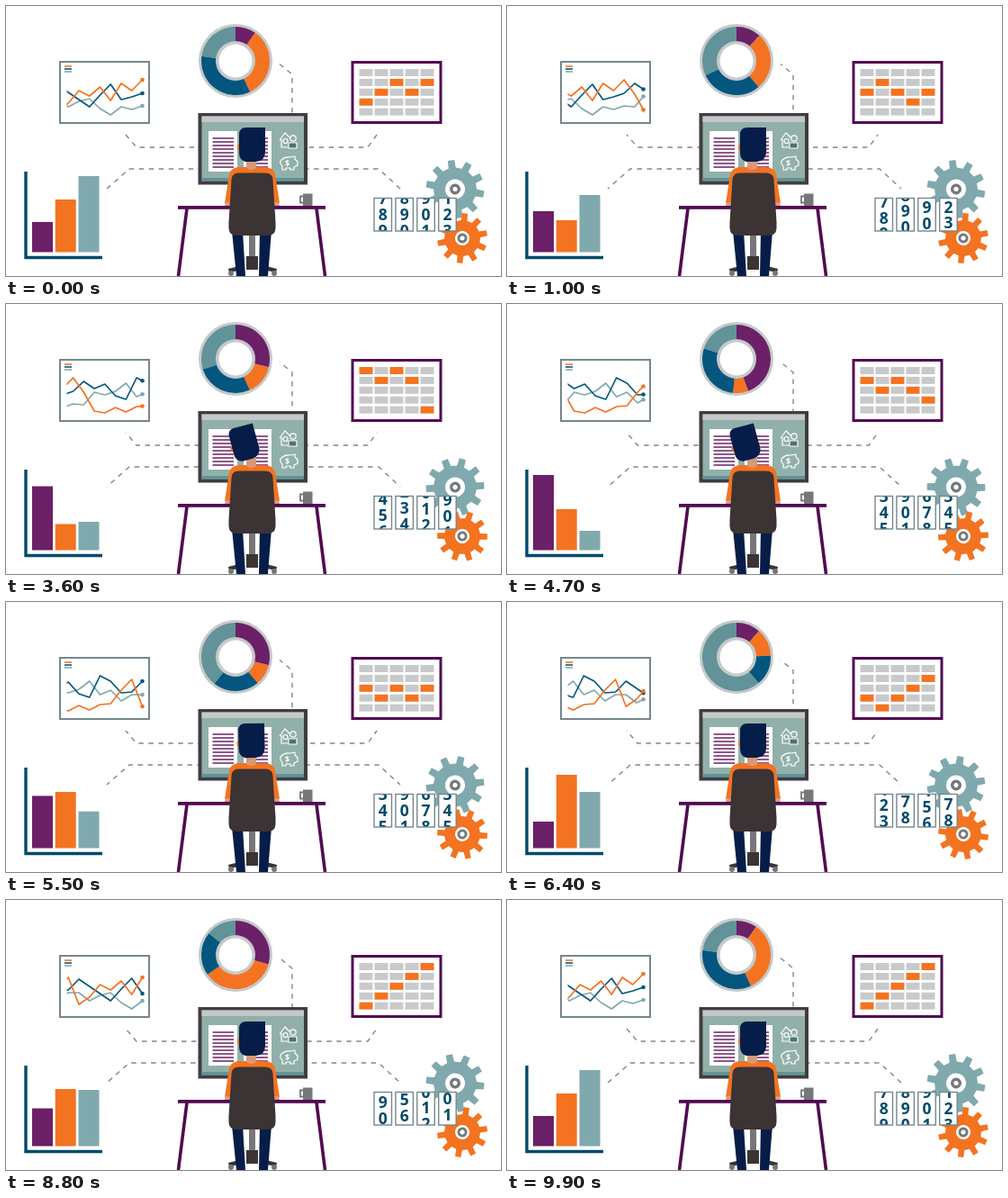
Recreate the animation shown at these times as an HTML page. Size 550 px wide and 300 px high, loop 10 s.

```html
<!DOCTYPE html>
<html lang="en">
<head>
<meta charset="utf-8">
<title>Office dashboard</title>
<style>
html, body { margin: 0; width: 100%; height: 100%; overflow: hidden; background: #fff; }
svg { display: block; width: 550px; height: 300px; }
.purple { fill: #6b2068; }
.orange { fill: #f37321; }
.navy { fill: #04567f; }
.teal { fill: #80a9ae; }
#links path { fill: none; stroke: #85878a; stroke-width: 1.4; stroke-dasharray: 5.5 5.5; }
#lines path { fill: none; stroke-width: 1.7; stroke-linejoin: round; }
#icons { fill: none; stroke: #fff; stroke-width: 1.2; stroke-linejoin: round; }
#reels text { font: bold 17.5px "Open Sans", "Noto Sans", sans-serif; fill: #004a6b; text-anchor: middle; }
</style>
</head>
<body>
<svg viewBox="0 0 550 300">
  <defs>
    <clipPath id="plot"><rect x="67.5" y="64" width="85" height="64"/></clipPath>
    <clipPath id="window"><rect x="405" y="214" width="100" height="35.5"/></clipPath>
  </defs>

  <g id="links">
    <path d="M133 143L145 157H214"/>
    <path d="M112 203L137 181H214"/>
    <path d="M412 143L402 157H335"/>
    <path d="M438 203L414 181H335"/>
    <path d="M304 64.500L318 76V120"/>
  </g>

  <!-- line chart -->
  <rect x="60" y="62" width="99" height="68" fill="#fff" stroke="#75878e" stroke-width="2"/>
  <path d="M65 67H73" stroke="#f37321" stroke-width="1.6"/>
  <path d="M65 70H73" stroke="#04567f" stroke-width="1.6"/>
  <path d="M65 73H73" stroke="#80a9ae" stroke-width="1.6"/>
  <g id="lines"></g>

  <!-- bar chart -->
  <g id="bars"></g>
  <path d="M22 184V279.500H107" fill="none" stroke="#004a6b" stroke-width="3.400"/>

  <!-- donut -->
  <circle cx="255" cy="61" r="41" fill="#c7c9cb"/>
  <g id="donut"></g>
  <circle cx="255" cy="61" r="22" fill="#c7c9cb"/>
  <circle cx="255" cy="61" r="18.500" fill="#fff"/>

  <!-- calendar -->
  <rect x="385" y="62.500" width="98" height="67" fill="#fff" stroke="#520a52" stroke-width="3"/>
  <g id="cells"></g>

  <!-- gears and counter -->
  <g id="gears"></g>
  <g id="reels"></g>

  <!-- monitor -->
  <rect x="213.500" y="119" width="121.500" height="79.500" fill="#403c40"/>
  <rect x="217.500" y="122.500" width="113.500" height="72" fill="#92b0aa"/>
  <rect x="217.500" y="122.500" width="113.500" height="6.500" fill="#c4c8c8"/>
  <rect x="217.500" y="191" width="113.500" height="3.500" fill="#619398"/>
  <path d="M225 139H257V184H225ZM264 139H295V184H264Z" fill="#fff"/>
  <g id="print" stroke="#6b2068" stroke-width="1.600"></g>
  <g id="icons">
    <path d="M304 149L310 141L316 147M306 148V157H313"/>
    <circle cx="310.500" cy="150" r="2.500"/>
    <circle cx="319" cy="147" r="3.200"/>
    <rect x="314" y="152" width="9" height="6" fill="#4f6f78"/>
    <path d="M306 171Q310 167 316 168L321 167V170L324 173V177L320 179V182H316V180H311V182H307V178Q303 174 306 171Z"/>
  </g>
  <text x="312.500" y="177.500" font-family="Open Sans, sans-serif" font-size="9" font-weight="700" fill="#fff" text-anchor="middle">$</text>

  <!-- desk -->
  <path d="M201 225L191.500 300M345 225L354.500 300" stroke="#520a52" stroke-width="3.600"/>
  <rect x="191" y="222" width="164" height="3.800" fill="#520a52"/>
  <path d="M330 208.500H340.500V222H330Z" fill="#77777b"/>
  <path d="M330 211.500H327V218.500H330" fill="none" stroke="#77777b" stroke-width="1.800"/>

  <!-- worker and chair -->
  <path d="M247 292L263 288V293L248 296ZM301 292L285 288V293L300 296Z" fill="#3b3334"/>
  <circle cx="250" cy="297" r="3" fill="#77777b"/>
  <circle cx="298" cy="297" r="3" fill="#77777b"/>
  <path d="M251 250H263L266 300H256ZM282 250H295L291 300H281Z" fill="#061d49"/>
  <path d="M243 219L248 187Q250 179 260 179H287Q297 179 299 187L304 219H297V224H250V219Z" class="orange"/>
  <path d="M244 218H249V222H243ZM298 218H303L304 222H298Z" fill="#d79a78"/>
  <path d="M267 168H278V180Q272.500 184 267 180Z" fill="#d79a78"/>
  <g id="head">
    <ellipse cx="259" cy="157" rx="2" ry="3.500" class="orange"/>
    <ellipse cx="286" cy="161" rx="2.600" ry="4.500" fill="#d79a78"/>
    <path d="M259 143Q259 135 267 135H288V162Q288 172 278 173H266Q259 171 259 163Z" fill="#061d49"/>
  </g>
  <path d="M270 252H277V292H270Z" fill="#77777b"/>
  <path d="M267 278H280V293H267Z" fill="#3b3334"/>
  <path d="M250.500 193Q251 185.500 259 185.500H288Q296 185.500 296.500 193L299.500 240V247Q299 255 291 255H256Q248 255 247.500 247V240Z" fill="#3b3334"/>
</svg>

<script>
const LOOP = 10000, LAST = 9900, STEP = 100;
const $ = id => document.getElementById(id);

function add(parent, tag, attrs, text) {
  const el = document.createElementNS("http://www.w3.org/2000/svg", tag);
  for (const k in attrs) el.setAttribute(k, attrs[k]);
  if (text !== undefined) el.textContent = text;
  parent.append(el);
  return el;
}

const clamp = (v, a, b) => Math.min(b, Math.max(a, v));
const mod = (v, n) => (v % n + n) % n;
const smooth = (t, a, b) => {
  const u = clamp((t - a) / (b - a), 0, 1);
  return u * u * (3 - 2 * u);
};

// Linear interpolation through shared key times
const TIMES = [0, 1000, 2500, 4700, 6400, 7700, 9900];
function tween(keys, t) {
  let i = 0;
  while (i < TIMES.length - 2 && t >= TIMES[i + 1]) i++;
  const u = (t - TIMES[i]) / (TIMES[i + 1] - TIMES[i]);
  return keys[i] + (keys[i + 1] - keys[i]) * u;
}

// Scrolling line chart: repeating points pass under a fixed end dot
const POINTS = 18, SPACING = 11.75, END_X = 151.5;
const series = [
  ["#80a9ae", [112,106,103,114,121,112,115,111,112,98,101,97,88,103,98,110,103,103]],
  ["#04567f", [96,104,112,99,87,104,101,97,86,94,89,102,106,82,88,101,100,88]],
  ["#f37321", [108,94,100,90,105,86,94,82,98,119,121,115,120,114,113,98,86,116]]
].map(([color, ys]) => ({
  ys,
  path: add($("lines"), "path", { stroke: color, "clip-path": "url(#plot)" }),
  dot: add($("lines"), "circle", { cx: END_X, r: 2.3, fill: color })
}));

function drawLines(p) {
  const scroll = p * POINTS, first = Math.floor(scroll), f = scroll - first;
  for (const { ys, path, dot } of series) {
    const at = k => ys[mod(k + 7, POINTS)];
    const pts = [];
    for (let k = first - 8; k <= first + 1; k++)
      pts.push((END_X + (k - scroll) * SPACING).toFixed(2) + " " + at(k));
    path.setAttribute("d", "M" + pts.join("L"));
    dot.setAttribute("cy", at(first) * (1 - f) + at(first + 1) * f);
  }
}

// Bars: top edge at each key time
const bars = [
  ["purple", 29, [240, 228, 215, 190, 244, 223, 240]],
  ["orange", 54.7, [215, 238, 261, 228, 192, 205, 215]],
  ["teal", 80.5, [189, 210, 232, 252, 211, 233, 189]]
].map(([cls, x, tops]) => ({ tops, el: add($("bars"), "rect", { class: cls, x, width: 23 }) }));

function drawBars(t) {
  for (const { tops, el } of bars) {
    const y = tween(tops, t);
    el.setAttribute("y", y);
    el.setAttribute("height", 273.5 - y);
  }
}

// Donut: end angle of each slice, clockwise from the top
const slices = [
  ["#6b2068", [35, 42, 48, 160, 41, 177, 35]],
  ["#f37321", [155, 140, 125, 186, 88, 315, 155]],
  ["#04567f", [278, 245, 217, 288, 140, 340, 278]],
  ["#619398", Array(7).fill(360)]
].map(([fill, ends]) => ({ ends, el: add($("donut"), "path", { fill }) }));

function drawDonut(t) {
  const rim = a => {
    const r = a * Math.PI / 180;
    return `${255 + 38 * Math.sin(r)} ${61 - 38 * Math.cos(r)}`;
  };
  let from = 0;
  for (const { ends, el } of slices) {
    const to = tween(ends, t);
    el.setAttribute("d", `M255 61L${rim(from)}A38 38 0 ${to - from > 180 ? 1 : 0} 1 ${rim(to)}Z`);
    from = to;
  }
}

// Calendar: marked row of each column, one digit per step
const marks = ["32101234", "21012343", "12101232", "23212321", "12343210"];
const cells = marks.map((_, c) => [0, 1, 2, 3, 4].map(r =>
  add($("cells"), "rect", { x: 392.5 + c * 17, y: 70 + r * 10.9, width: 15, height: 8 })));

function drawCalendar(t) {
  const step = Math.min(7, Math.floor(t / 1000));
  cells.forEach((col, c) => col.forEach((el, r) =>
    el.setAttribute("fill", r === +marks[c][step] ? "#f37321" : "#c7c9cb")));
}

// Gears
function makeGear(cls, cx, cy, outer, inner, hole, hub, phase) {
  const n = 10, pts = [];
  for (let i = 0; i < n; i++)
    for (const [off, r] of [[-0.27, inner], [-0.18, outer], [0.18, outer], [0.27, inner]]) {
      const a = (i + off) / n * 2 * Math.PI;
      pts.push((r * Math.sin(a)).toFixed(2) + "," + (-r * Math.cos(a)).toFixed(2));
    }
  const g = add($("gears"), "g", {});
  add(g, "polygon", { class: cls, points: pts.join(" ") });
  add(g, "circle", { r: hole, fill: "#fff" });
  add(g, "circle", { r: hub, fill: "#75787c" });
  add(g, "circle", { r: 2.6, fill: "#fff" });
  return turn => g.setAttribute("transform", `translate(${cx} ${cy}) rotate(${phase + turn})`);
}
const tealGear = makeGear("teal", 499, 203.5, 32.5, 24, 11, 6, -8);
const orangeGear = makeGear("orange", 507, 258, 28, 20, 8, 5.5, 6);

// Counter: start digit and the travel in each quarter of the loop
const GAP = 17.8;
const reels = [
  [8, [-3, -1, -2, -4]],
  [9, [3, 8, 9, 10]],
  [10, [-8, -5, -14, -3]],
  [2, [7, 5, 4, 4]]
].map(([start, moves], i) => {
  const x = 409 + i * 23.9;
  add($("reels"), "rect", { x, y: 213.5, width: 19.5, height: 36.5, fill: "#fff", stroke: "#75878e", "stroke-width": 1.4 });
  const strip = add($("reels"), "g", { "clip-path": "url(#window)" });
  const digits = [-2, -1, 0, 1, 2].map(() => add(strip, "text", { x: x + 9.8 }));
  return { start, moves, digits };
});

const snap = u => u < 0.5 ? 0.5 * (2 * u) ** 9 : 1 - 0.5 * (2 - 2 * u) ** 9;

function drawReels(t) {
  const quarter = t / LOOP * 4;
  for (const { start, moves, digits } of reels) {
    const v = moves.reduce((sum, m, i) => sum + m * snap(clamp(quarter - i, 0, 1)), start);
    const mid = Math.round(v);
    digits.forEach((el, i) => {
      const n = mid + i - 2;
      el.textContent = mod(n, 10);
      el.setAttribute("y", 238 + (n - v) * GAP);
    });
  }
}

for (let y = 147; y < 182; y += 4)
  add($("print"), "path", { d: `M229.500 ${y}H253M268 ${y}H291` });

function draw(t) {
  const p = t / LAST;
  drawLines(p);
  drawBars(t);
  drawDonut(t);
  drawCalendar(t);
  drawReels(t);
  tealGear(360 * p);
  orangeGear(-360 * p);
  $("links").setAttribute("stroke-dashoffset", -mod(p * 7, 1) * 11);
  const tilt = smooth(t, 1600, 2200) - smooth(t, 5000, 5600);
  $("head").setAttribute("transform", `translate(${-4 * tilt} 0) rotate(${-15 * tilt} 273 172)`);
}

const origin = performance.now();
function tick() {
  const ms = (performance.now() - origin) % LOOP;
  draw(Math.min(LAST, Math.floor(ms / STEP) * STEP));
  requestAnimationFrame(tick);
}
tick();
</script>
</body>
</html>
```
